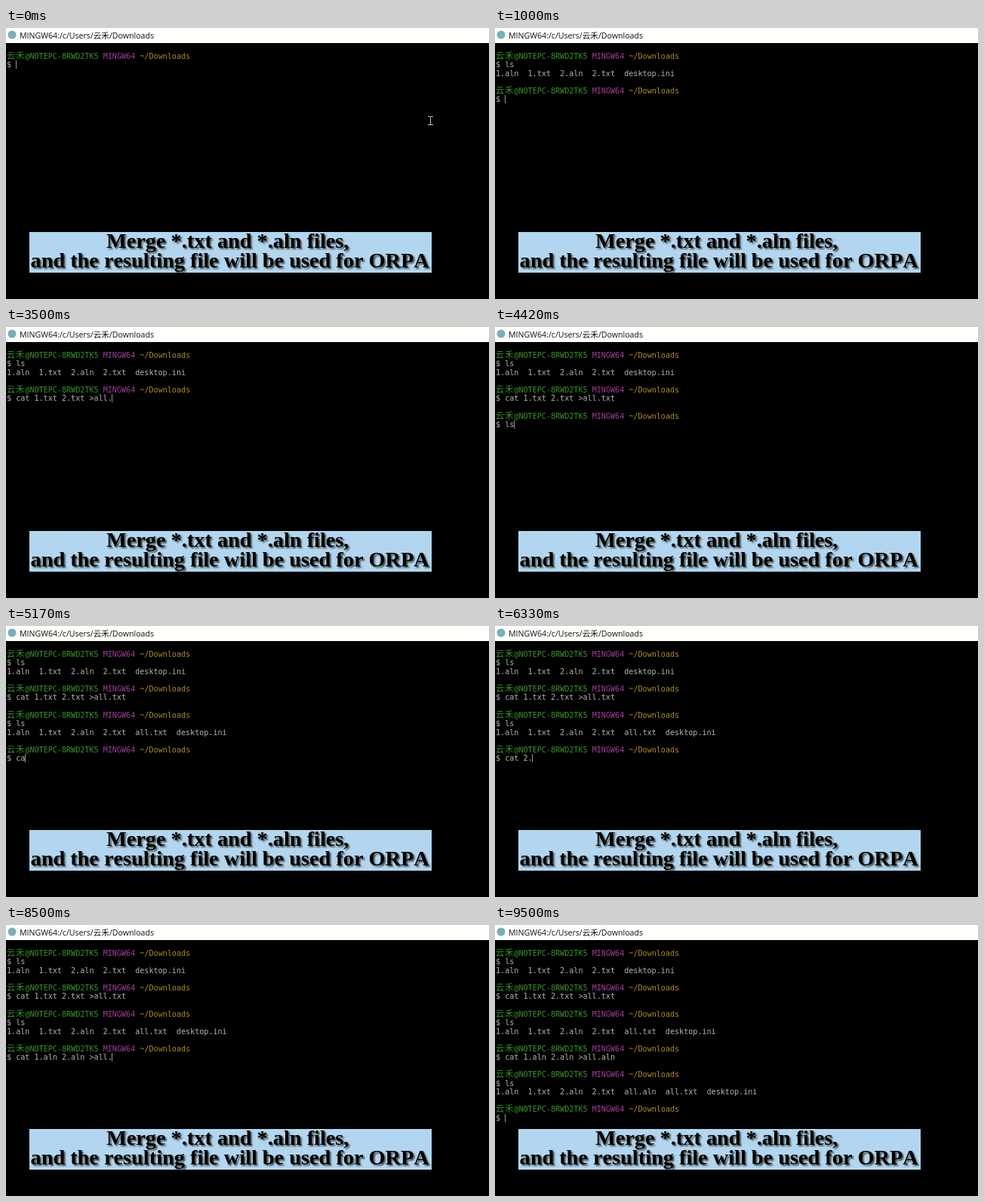
Animation, 640 px wide and 360 px high, one loop 9.58 s. Source, as an HTML page with a canvas:

```html
<!DOCTYPE html>
<html lang="en">
<head>
<meta charset="utf-8">
<title>Merging files in a terminal</title>
<style>
  html, body { margin: 0; width: 100%; height: 100%; overflow: hidden; background: #000; }
  canvas { display: block; width: 640px; height: 360px; }
</style>
</head>
<body>
<canvas id="stage" width="640" height="360"></canvas>
<script>
const ctx = document.getElementById('stage').getContext('2d');
const LOOP = 9580;
const CELL = 6.08, LEFT = 1, ROW = 11.53, FIRST_BASELINE = 40.8;
const MONO = '10.1px "DejaVu Sans Mono", monospace';
const CJK = '11px "Noto Sans CJK SC", "Noto Sans CJK", sans-serif';
const TITLE = '10.6px "Open Sans", "Noto Sans CJK SC", sans-serif';
const CAPTION = 'bold 28.3px "Liberation Serif", serif';
const USER = '云禾', HOST = '@NOTEPC-8RWD2TK5';
const COLOR = {
  text: '#b4b4ac', cursor: '#96968e', green: '#3a9428', magenta: '#a04098', path: '#b08a20'
};

// Each command: when its prompt appears, its input over time, what it prints.
const session = [
  { at: 0, keys: [[250, 'l'], [420, 'ls']],
    output: '1.aln  1.txt  2.aln  2.txt  desktop.ini' },
  { at: 670, keys: [
      [1250, 'c'], [1330, 'ca'], [1420, 'cat'], [1580, 'cat '],
      [1750, 'cat 1'], [1920, 'cat 1.'], [2000, 'cat 1.t'], [2080, 'cat 1.txt '],
      [2250, 'cat 1.txt 2'], [2330, 'cat 1.txt 2.'], [2500, 'cat 1.txt 2.t'],
      [2580, 'cat 1.txt 2.txt '], [2750, 'cat 1.txt 2.txt >'],
      [3000, 'cat 1.txt 2.txt >a'], [3170, 'cat 1.txt 2.txt >al'],
      [3330, 'cat 1.txt 2.txt >all'], [3500, 'cat 1.txt 2.txt >all.'],
      [3580, 'cat 1.txt 2.txt >all.t'], [3670, 'cat 1.txt 2.txt >all.txt']] },
  { at: 3920, keys: [[4170, 'l'], [4330, 'ls']],
    output: '1.aln  1.txt  2.aln  2.txt  all.txt  desktop.ini' },
  { at: 4580, keys: [
      [5000, 'c'], [5170, 'ca'], [5330, 'cat'], [5670, 'cat '],
      [5830, 'cat 2'], [6000, 'cat 2.'], [6420, 'cat '], [6500, 'cat 1'],
      [6670, 'cat 1.'], [6830, 'cat 1.a'], [7000, 'cat 1.aln '],
      [7330, 'cat 1.aln 2'], [7500, 'cat 1.aln 2.'], [7750, 'cat 1.aln 2.a'],
      [7830, 'cat 1.aln 2.aln '], [8000, 'cat 1.aln 2.aln >'],
      [8170, 'cat 1.aln 2.aln >a'], [8250, 'cat 1.aln 2.aln >al'],
      [8330, 'cat 1.aln 2.aln >all'], [8500, 'cat 1.aln 2.aln >all.'],
      [8670, 'cat 1.aln 2.aln >all.a'], [8750, 'cat 1.aln 2.aln >all.al'],
      [8830, 'cat 1.aln 2.aln >all.aln']] },
  { at: 9000, keys: [[9170, 'l'], [9330, 'ls']],
    output: '1.aln  1.txt  2.aln  2.txt  all.aln  all.txt  desktop.ini' },
  { at: 9500, keys: [] }
];

function put(text, col, row, color, font = MONO) {
  ctx.font = font;
  ctx.fillStyle = color;
  ctx.fillText(text, LEFT + col * CELL, FIRST_BASELINE + row * ROW);
}

function drawPrompt(row) {
  [...USER].forEach((glyph, i) => put(glyph, i * 2, row, COLOR.green, CJK));
  put(HOST, 4, row, COLOR.green);
  put('MINGW64', 21, row, COLOR.magenta);
  put('~/Downloads', 29, row, COLOR.path);
}

function drawCursor(col, row) {
  ctx.fillStyle = COLOR.cursor;
  ctx.fillRect(Math.floor(LEFT + col * CELL), Math.round(FIRST_BASELINE + row * ROW - 9), 1, 11);
}

function drawTerminal(t) {
  let row = 0;
  session.forEach((command, i) => {
    if (t < command.at) return;
    const next = session[i + 1];
    const done = next && t >= next.at;
    const typed = command.keys.filter(([at]) => at <= t).pop();
    const line = '$ ' + (typed ? typed[1] : '');
    drawPrompt(row);
    put(line, 0, row + 1, COLOR.text);
    if (!done) {
      const blinkedOff = t >= 4830 && t < 5000;
      if (!blinkedOff) drawCursor(line.length, row + 1);
      return;
    }
    if (command.output) put(command.output, 0, row + 2, COLOR.text);
    row += command.output ? 4 : 3;
  });
}

function drawTitleBar() {
  ctx.fillStyle = '#fffffc';
  ctx.fillRect(0, 0, 640, 20);
  ctx.fillStyle = '#78aebd';
  ctx.beginPath();
  ctx.arc(8, 9, 5.5, 0, Math.PI * 2);
  ctx.fill();
  ctx.font = TITLE;
  ctx.fillStyle = '#111';
  ctx.fillText(`MINGW64:/c/Users/${USER}/Downloads`, 18, 13.6);
}

function drawPointer(x, y) {
  ctx.fillStyle = '#d0d0c8';
  ctx.fillRect(x, y - 5, 1, 11);
  for (const edge of [y - 6, y + 5]) {
    ctx.fillRect(x - 3, edge, 3, 1);
    ctx.fillRect(x + 1, edge, 3, 1);
  }
}

function drawCaption() {
  ctx.save();
  ctx.beginPath();
  ctx.rect(31, 271, 533, 54);
  ctx.clip();
  ctx.fillStyle = '#b3d6f0';
  ctx.fillRect(31, 271, 533, 54);
  ctx.font = CAPTION;
  ctx.fontKerning = 'none';
  ctx.fillStyle = '#000';
  ctx.shadowColor = 'rgba(50, 55, 45, 0.85)';
  ctx.shadowOffsetX = ctx.shadowOffsetY = 2;
  ctx.shadowBlur = 2;
  ctx.fillText('Merge *.txt and *.aln files,', 133, 291.5);
  ctx.fillText('and the resulting file will be used for ORPA', 32.5, 317.5);
  ctx.restore();
}

function draw(now) {
  const t = now % LOOP;
  ctx.fillStyle = '#000';
  ctx.fillRect(0, 0, 640, 360);
  drawTitleBar();
  drawTerminal(t);
  if (t < 250) drawPointer(562, 123);
  drawCaption();
}

let start;
function tick(now) {
  start ??= now;
  draw(now - start);
  requestAnimationFrame(tick);
}
draw(0);
requestAnimationFrame(tick);
</script>
</body>
</html>
```
